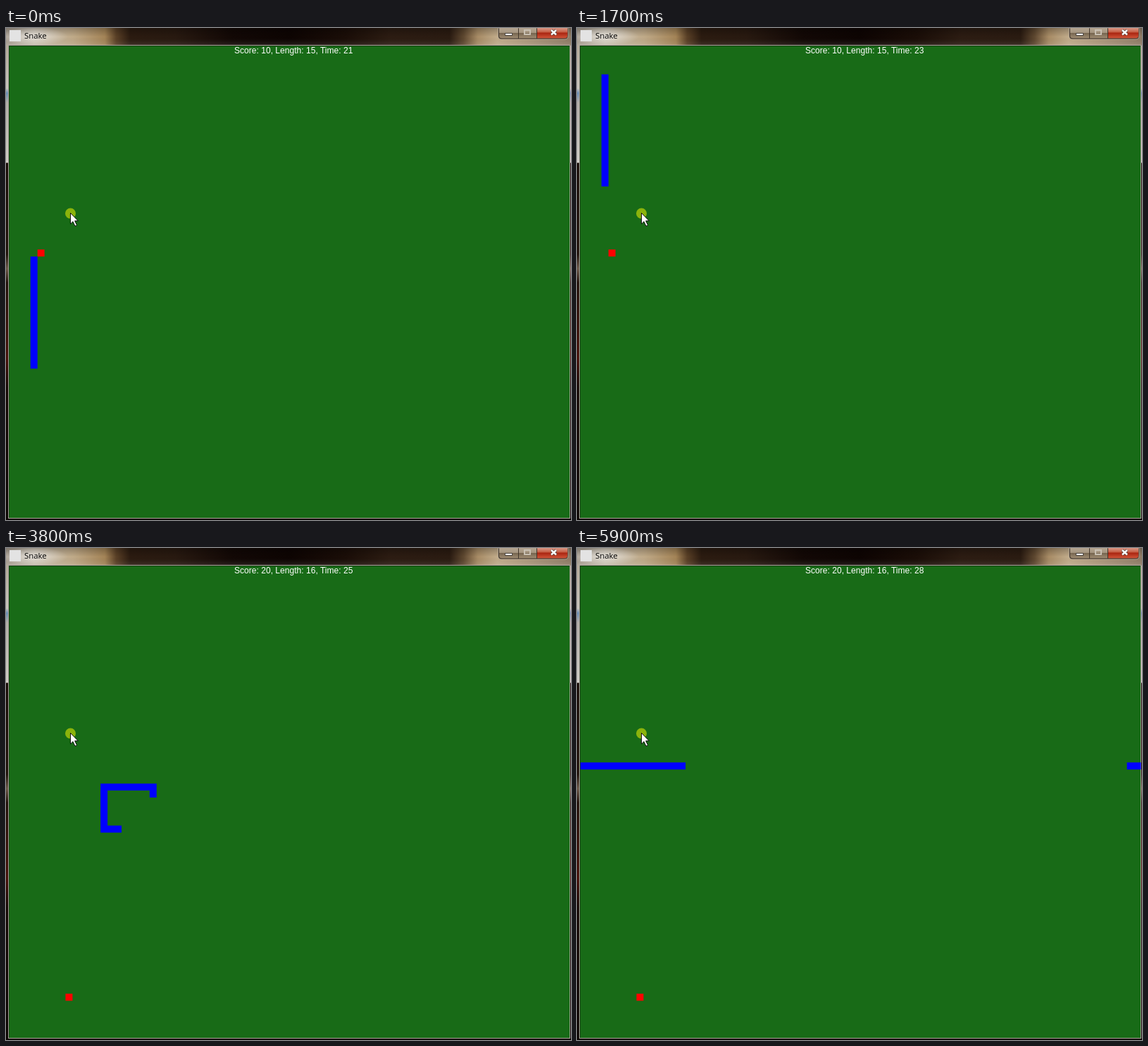
An HTML page for the animation above (6000 ms loop, 802x698 px).

```html
<!DOCTYPE html>
<html lang="en">
<head>
<meta charset="utf-8">
<title>Snake</title>
<style>
  html, body { margin: 0; width: 100%; height: 100%; overflow: hidden; background: #120a05; }
  svg { display: block; width: 802px; height: 698px; }
  .title { font: 11.4px "Open Sans", "Noto Sans", sans-serif; fill: #000; }
  .score { font: 12px "Liberation Sans", Arial, sans-serif; letter-spacing: .03px; fill: #fff; }
</style>
</head>
<body>
<svg viewBox="0 0 802 698" xmlns="http://www.w3.org/2000/svg">
  <defs>
    <linearGradient id="bar">
      <stop offset="0" stop-color="#a99f92"/>
      <stop offset=".05" stop-color="#c8beae"/>
      <stop offset=".12" stop-color="#c0aa88"/>
      <stop offset=".175" stop-color="#a48457"/>
      <stop offset=".195" stop-color="#5a4026"/>
      <stop offset=".22" stop-color="#2b1b10"/>
      <stop offset=".3" stop-color="#281910"/>
      <stop offset=".4" stop-color="#120805"/>
      <stop offset=".5" stop-color="#0d0402"/>
      <stop offset=".6" stop-color="#1a0d07"/>
      <stop offset=".68" stop-color="#2c1c12"/>
      <stop offset=".785" stop-color="#2a1b11"/>
      <stop offset=".81" stop-color="#5f4830"/>
      <stop offset=".835" stop-color="#a88c66"/>
      <stop offset=".87" stop-color="#c3ad8c"/>
      <stop offset="1" stop-color="#8f7c66"/>
    </linearGradient>
    <linearGradient id="shade" x2="0" y2="1">
      <stop offset="0" stop-color="#000" stop-opacity=".25"/>
      <stop offset=".5" stop-color="#000" stop-opacity="0"/>
      <stop offset="1" stop-color="#fff" stop-opacity=".12"/>
    </linearGradient>
    <linearGradient id="side" x2="0" y2="1">
      <stop offset="0" stop-color="#b5a999"/>
      <stop offset=".09" stop-color="#c9c4bd"/>
      <stop offset=".1" stop-color="#6d8fb4"/>
      <stop offset=".12" stop-color="#b3aea8"/>
      <stop offset=".246" stop-color="#d0ccc6"/>
      <stop offset=".248" stop-color="#1a0d08"/>
      <stop offset=".44" stop-color="#21120b"/>
      <stop offset=".47" stop-color="#6d5a4a"/>
      <stop offset=".5" stop-color="#22100a"/>
      <stop offset=".66" stop-color="#47100a"/>
      <stop offset=".72" stop-color="#160805"/>
      <stop offset="1" stop-color="#0c0503"/>
    </linearGradient>
    <linearGradient id="grey" x2="0" y2="1">
      <stop offset="0" stop-color="#b5a692"/>
      <stop offset=".45" stop-color="#a59580"/>
      <stop offset=".5" stop-color="#75654f"/>
      <stop offset="1" stop-color="#a08d73"/>
    </linearGradient>
    <linearGradient id="red" x2="0" y2="1">
      <stop offset="0" stop-color="#d99a88"/>
      <stop offset=".42" stop-color="#c5593f"/>
      <stop offset=".48" stop-color="#a92410"/>
      <stop offset="1" stop-color="#d1553a"/>
    </linearGradient>
    <radialGradient id="glow">
      <stop offset="0" stop-color="#fff" stop-opacity=".55"/>
      <stop offset="1" stop-color="#fff" stop-opacity="0"/>
    </radialGradient>
  </defs>

  <!-- window frame -->
  <rect width="802" height="698" fill="#140a06"/>
  <rect width="802" height="25" fill="url(#bar)"/>
  <rect width="802" height="25" fill="url(#shade)"/>
  <rect y="25" width="4" height="673" fill="url(#side)"/>
  <rect x="801" y="25" width="1" height="673" fill="url(#side)"/>
  <ellipse cx="40" cy="12" rx="48" ry="13" fill="url(#glow)"/>
  <rect x="5" y="3" width="16" height="16" fill="#e3e3e3"/>
  <text class="title" x="26" y="15">Snake</text>

  <!-- window buttons -->
  <path d="M698.5 0V11q0 5 5 5H793q5 0 5-5V0z" fill="#40342a" stroke="#d3c6b4" stroke-opacity=".6"/>
  <path d="M700 0V11q0 3.500 4 3.500H727V0z" fill="url(#grey)"/>
  <path d="M728 0H753V14.500H728z" fill="url(#grey)"/>
  <path d="M754 0H797V11q0 3.500-4 3.500H754z" fill="url(#red)"/>
  <rect x="708.500" y="7.500" width="10" height="3" fill="#fff" stroke="#4b4540"/>
  <rect x="736" y="3" width="8" height="6" fill="none" stroke="#c9c0b3" stroke-width="2"/>
  <path d="M774 3l7 6.500M781 3l-7 6.500" stroke="#53403b" stroke-width="4"/>
  <path d="M774 3l7 6.500M781 3l-7 6.500" stroke="#fff" stroke-width="2.400"/>

  <!-- playing field -->
  <rect x="3.500" y="24.500" width="797" height="671" fill="#186b17" stroke="#a8a39b"/>
  <path d="M4.500 695V25.500H800" fill="none" stroke="#123f10"/>
  <path id="snake" fill="#00f"/>
  <path id="apple" fill="#f00"/>
  <text class="score" id="score" x="324" y="36"></text>

  <!-- pointer -->
  <circle cx="91.500" cy="263" r="7.500" fill="#8bb30c"/>
  <path d="M91.500 262.500v15.500l3.500-3.400 3 6.400 2.600-1.200-2.900-6.100h4.600z" fill="#fff" stroke="#111"/>
</svg>
<script>
const LOOP = 6000, TICK = 100, COLS = 80, ROWS = 67;
const EAT = 52;

// Trail walked by the head, starting where the tail first lies
const TURNS = "D66 R14 D8 L4 U6 R7 D4 L5 U13 R3 D6 L20";
const DIRS = { U: [0, -1], D: [0, 1], L: [-1, 0], R: [1, 0] };

// [time in ms, steps taken]
const PACE = [[0, 0], [700, 16], [1700, 41], [2900, 70], [3800, 91], [4600, 110], [5900, 141]];

const $ = id => document.getElementById(id);
const wrap = (n, size) => (n % size + size) % size;
const px = col => (4.9 + col * 9.945).toFixed(2);
const py = row => (26 + row * 9.94).toFixed(2);

function walk(x, y) {
  const cells = [[x, y]];
  for (const turn of TURNS.split(" ")) {
    const [dx, dy] = DIRS[turn[0]];
    for (let n = +turn.slice(1); n > 0; n--) {
      x = wrap(x + dx, COLS);
      y = wrap(y + dy, ROWS);
      cells.push([x, y]);
    }
  }
  return cells;
}

function stepsAt(t) {
  const i = PACE.findIndex(([end]) => t <= end);
  if (i < 1) return 0;
  const [t0, s0] = PACE[i - 1], [t1, s1] = PACE[i];
  return Math.round(s0 + (s1 - s0) * (t - t0) / (t1 - t0));
}

const square = ([c, r]) => `M${px(c)} ${py(r)}H${px(c + 1)}V${py(r + 1)}H${px(c)}z`;
const trail = walk(3, 30);

function draw(t) {
  const steps = stepsAt(t);
  const eaten = steps >= EAT ? 1 : 0;
  const head = 15 + steps;
  const seconds = 22 + Math.floor((t - 100) / 960);
  $("snake").setAttribute("d", trail.slice(head - 15 - eaten, head + 1).map(square).join(""));
  $("apple").setAttribute("d", square(eaten ? [8, 61] : [4, 29]));
  $("score").textContent = `Score: ${10 + 10 * eaten}, Length: ${15 + eaten}, Time: ${seconds}`;
}

const start = performance.now();
let shown = -1;

function frame() {
  const t = Math.floor((performance.now() - start) % LOOP / TICK) * TICK;
  if (t !== shown) draw(shown = t);
  requestAnimationFrame(frame);
}
frame();
</script>
</body>
</html>
```
